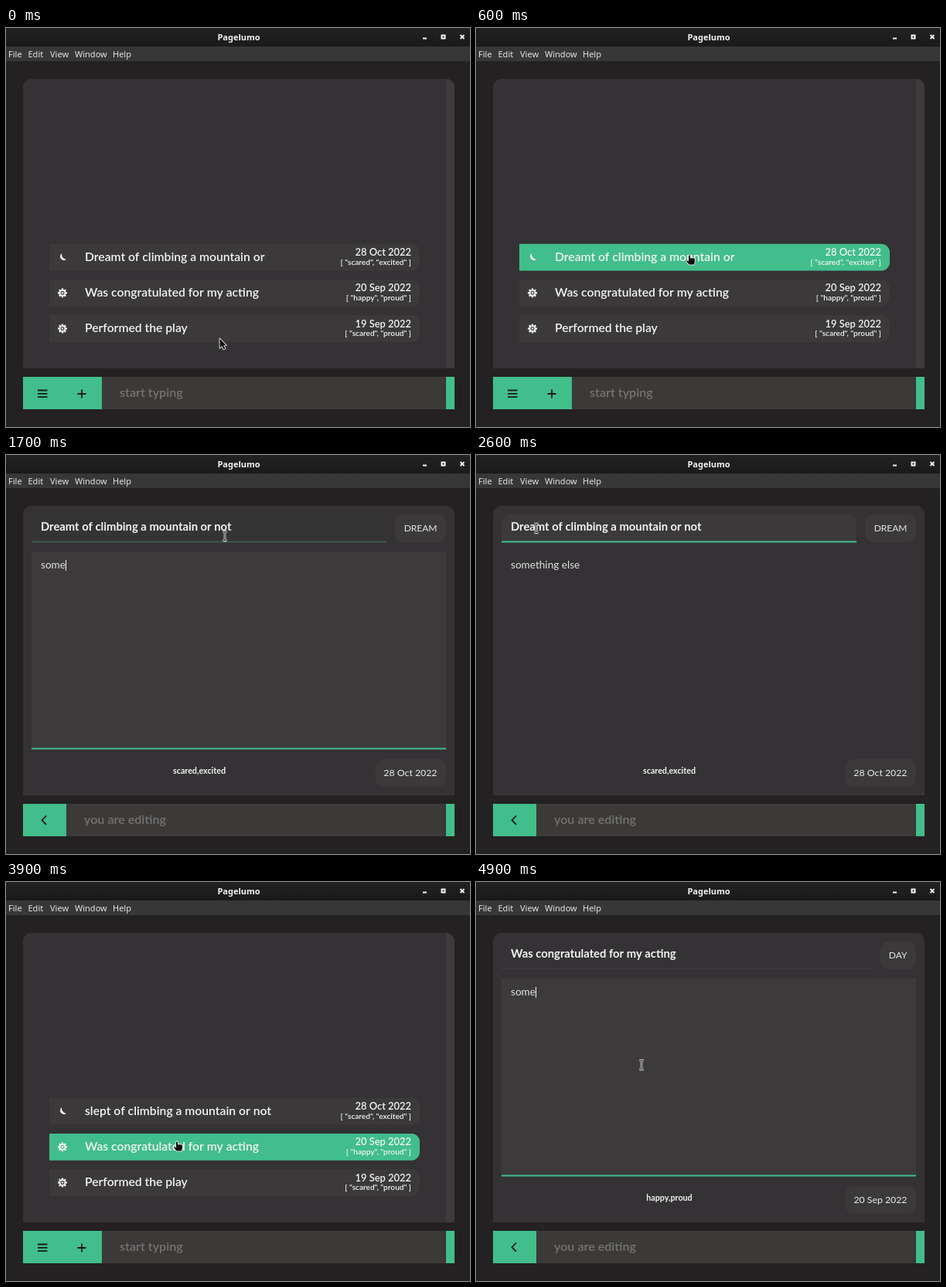
Recreate the animation shown at these times as an HTML page with a canvas. Size 600 by 517 pixels, loop 5000 ms.

```html
<!DOCTYPE html>
<html lang="en">
<head>
<meta charset="utf-8">
<title>Pagelumo</title>
<style>
html, body { margin: 0; height: 100%; overflow: hidden; background: #232122; }
canvas { display: block; }
</style>
</head>
<body>
<canvas id="stage" width="600" height="517"></canvas>
<script>
const c = document.getElementById('stage').getContext('2d');
const LOOP = 5000, STEP = 100;
const GREEN = '#41be8b', WHITE = '#f4f4f4', INK = '#191919', PANEL = '#343234', CARD = '#3b393a';
const ui = (size, weight = 400) => `${weight} ${size}px Lato, "Open Sans", sans-serif`;
const sys = (size, weight = 400) => `${weight} ${size}px "Noto Sans", sans-serif`;

// Pointer keys: time, x, y
const path = [
  [0, 276, 402], [100, 276, 402], [500, 276, 297], [1200, 276, 297], [1500, 283, 105],
  [2200, 283, 105], [2500, 78, 95], [3100, 78, 95], [3400, 64, 475], [3600, 64, 475],
  [3900, 221, 339], [4600, 221, 339], [4700, 214, 237], [5000, 214, 237]
];

const entries = [
  { title: 'Dreamt of climbing a mountain or', date: '28 Oct 2022', tags: ['scared', 'excited'], dream: true },
  { title: 'Was congratulated for my acting', date: '20 Sep 2022', tags: ['happy', 'proud'] },
  { title: 'Performed the play', date: '19 Sep 2022', tags: ['scared', 'proud'] }
];

const ramp = (t, from, to) => Math.max(0, Math.min(1, (t - from) / (to - from)));
const typed = (text, t, from, to) => text.slice(0, Math.round(text.length * ramp(t, from, to)));

function pointerAt(t) {
  const i = Math.max(1, path.findIndex(k => k[0] >= t));
  const [t0, x0, y0] = path[i - 1], [t1, x1, y1] = path[i];
  const p = ramp(t, t0, t1), e = p * p * (3 - 2 * p);
  return [x0 + (x1 - x0) * e, y0 + (y1 - y0) * e];
}

function box(x, y, w, h, fill, radius = 0) {
  c.fillStyle = fill;
  c.beginPath();
  c.roundRect(x, y, w, h, radius);
  c.fill();
}

function text(s, x, y, font, fill = WHITE, align = 'left') {
  c.font = font;
  c.fillStyle = fill;
  c.textAlign = align;
  c.fillText(s, x, y);
}

function stroke(d, color, width) {
  c.strokeStyle = color;
  c.lineWidth = width;
  c.stroke(new Path2D(d));
}

function caret(s, x, y, font) {
  c.font = font;
  box(Math.round(x + c.measureText(s).width), y, 1, 14, WHITE);
}

function drawWindow() {
  box(0, 0, 600, 517, '#232122');
  const bar = c.createLinearGradient(0, 0, 0, 24);
  bar.addColorStop(0, '#222222');
  bar.addColorStop(1, '#1a1a1a');
  box(0, 0, 600, 24, bar);
  box(0, 24, 600, 19, '#373737');
  text('Pagelumo', 301, 16, sys(11, 700), WHITE, 'center');
  stroke('M539 13.5h5', WHITE, 2);
  stroke('M563.5 9.5h4v4h-4z', WHITE, 2);
  stroke('M587.5 9l5 5m0-5l-5 5', WHITE, 1.8);
  [['File', 3], ['Edit', 28.5], ['View', 57], ['Window', 89], ['Help', 138]]
    .forEach(([s, x]) => text(s, x, 38, sys(11), '#e4e4e4'));
  box(22, 66, 558, 375, PANEL, [11, 11, 0, 0]);
  box(22, 452, 558, 42, '#3b3a39');
  box(569, 452, 11, 42, GREEN);
}

function drawMoon(x, y) {
  c.fillStyle = WHITE;
  c.fill(new Path2D(`M${x - 1} ${y - 5}A5 5 0 1 0 ${x + 5} ${y + 3}A7 7 0 0 1 ${x - 1} ${y - 5}z`));
}

function drawSun(x, y) {
  c.save();
  c.translate(x, y);
  for (let i = 0; i < 8; i++) {
    c.rotate(Math.PI / 4);
    box(-1.2, -6, 2.4, 3, WHITE, .6);
  }
  c.beginPath();
  c.arc(0, 0, 3.4, 0, 7);
  c.strokeStyle = WHITE;
  c.lineWidth = 1.8;
  c.stroke();
  box(-1.3, -1.3, 2.6, 2.6, WHITE, 1.3);
  c.restore();
}

function drawList(hovered, firstTitle) {
  box(569, 66, 11, 375, '#3d3b3d', [0, 11, 0, 0]);
  entries.forEach((entry, i) => {
    const y = 279.7 + i * 46.2;
    box(56, y, 479, 34.8, i === hovered ? GREEN : CARD, [0, 11, 11, 0]);
    (entry.dream ? drawMoon : drawSun)(73, y + 17.4);
    text(i ? entry.title : firstTitle, 102, y + 22.3, ui(15.7, 600));
    text(entry.date, 524, y + 15.5, ui(12.9, 600), WHITE, 'right');
    text(`[ ${entry.tags.map(s => `"${s}"`).join(', ')} ]`, 524, y + 26.8, ui(10.1, 600), WHITE, 'right');
  });
  box(22, 452, 102, 42, GREEN);
  stroke('M41 469.5h12.5m-12.5 4.3h12.5m-12.5 4.3h12.5', INK, 1.8);
  stroke('M92.5 474h11m-5.5-5.5v11', INK, 1.8);
  text('start typing', 147, 478, ui(16.1, 600), '#747372');
}

function drawEditor(entry, title, body, titleFocus, bodyFocus, caretIn) {
  const buttonX = entry.dream ? 503 : 523, titleEnd = buttonX - 11;
  const titleFont = ui(14.8, 700), bodyFont = ui(13.6);

  c.globalAlpha = titleFocus;
  box(33, 77, titleEnd - 33, 35, CARD, [11, 11, 0, 0]);
  c.globalAlpha = 1;
  box(33, 112, titleEnd - 33, 1, '#403e40');
  c.globalAlpha = titleFocus;
  box(33, 111.5, titleEnd - 33, 2, GREEN);

  c.globalAlpha = bodyFocus;
  box(33, 125, 536, 255, '#3c3a3b');
  box(33, 379.5, 536, 2, GREEN);
  c.globalAlpha = 1;

  text(title, 45, 98, titleFont);
  text(body, 45, 147, bodyFont, '#e2e2e2');
  if (caretIn === 'body') caret(body, 45, 136, bodyFont);
  if (caretIn === 'title') caret('slept', 45, 87, titleFont);

  box(buttonX, 77, 569 - buttonX, 36, CARD, 11);
  text(entry.dream ? 'DREAM' : 'DAY', 557.5, 99, ui(12), '#e6e6e6', 'right');
  box(477.5, 394, 91.5, 35.5, CARD, 11);
  text(entry.date, 557.5, 415.5, ui(12.3), '#ececec', 'right');
  text(entry.tags.join(','), 250, 413, ui(10.7, 700), WHITE, 'center');

  box(22, 452, 56, 42, GREEN);
  stroke('M52 467.5l-5.5 5.7l5.5 5.7', INK, 1.8);
  text('you are editing', 101, 478, ui(16.1, 600), '#747372');
}

function drawPointer(kind, x, y) {
  c.save();
  c.translate(x, y);
  c.lineJoin = 'round';
  if (kind === 'text') {
    const beam = 'M-3-6h2l1 1l1-1h2M0-5v10M-3 6h2l1-1l1 1h2';
    stroke(beam, WHITE, 2.6);
    stroke(beam, '#111', 1);
  } else {
    const d = kind === 'arrow'
      ? 'M.5.5v12l2.7-2.5l2.2 4.4l2-1l-2.2-4.2h3.5z'
      : 'M-1-2q1.3-1.2 2 0v3.2h4.5q1.4.2 1.4 2v3l-1.2 3.3h-6l-3.5-4q0-1.6 1.6-1l1.2 1z';
    stroke(d, '#e8e8e8', 1.8);
    c.fillStyle = '#111';
    c.fill(new Path2D(d));
  }
  c.restore();
}

function draw(t) {
  drawWindow();
  const [x, y] = pointerAt(t);
  const inList = t < 900 || (t >= 3700 && t < 4200);
  let kind = 'text';

  if (inList) {
    const hovered = entries.findIndex((_, i) => x > 56 && Math.abs(y - 295 - i * 46.2) < 14);
    drawList(hovered, t < 900 ? entries[0].title : 'slept of climbing a mountain or not');
    kind = hovered < 0 ? 'arrow' : 'hand';
  } else if (t < 3700) {
    const word = t < 2800 ? 'Dreamt' : typed('slept', t, 2800, 3200);
    const body = t < 1700 ? '' : 'some' + typed('thing else', t, 1700, 2200);
    const titleFocus = t < 2400 ? .25 * ramp(t, 1300, 1500) : ramp(t, 2300, 2500);
    const bodyFocus = ramp(t, 1300, 1500) * (1 - ramp(t, 2300, 2600));
    const caretIn = t >= 3200 ? 'title' : t >= 1400 && t < 2300 ? 'body' : '';
    drawEditor(entries[0], word + ' of climbing a mountain or not', body, titleFocus, bodyFocus, caretIn);
    if (y > 452) kind = 'hand';
    else if (y > 383) kind = 'arrow';
  } else {
    const focused = t >= 4900;
    drawEditor(entries[1], entries[1].title, focused ? 'some' : '', 0, focused ? 1 : 0, t < 4700 ? '' : 'body');
  }
  drawPointer(kind, x, y);
}

function frame() {
  const t = performance.now() % LOOP;
  draw(Math.floor(t / STEP) * STEP);
  requestAnimationFrame(frame);
}
frame();
</script>
</body>
</html>
```
